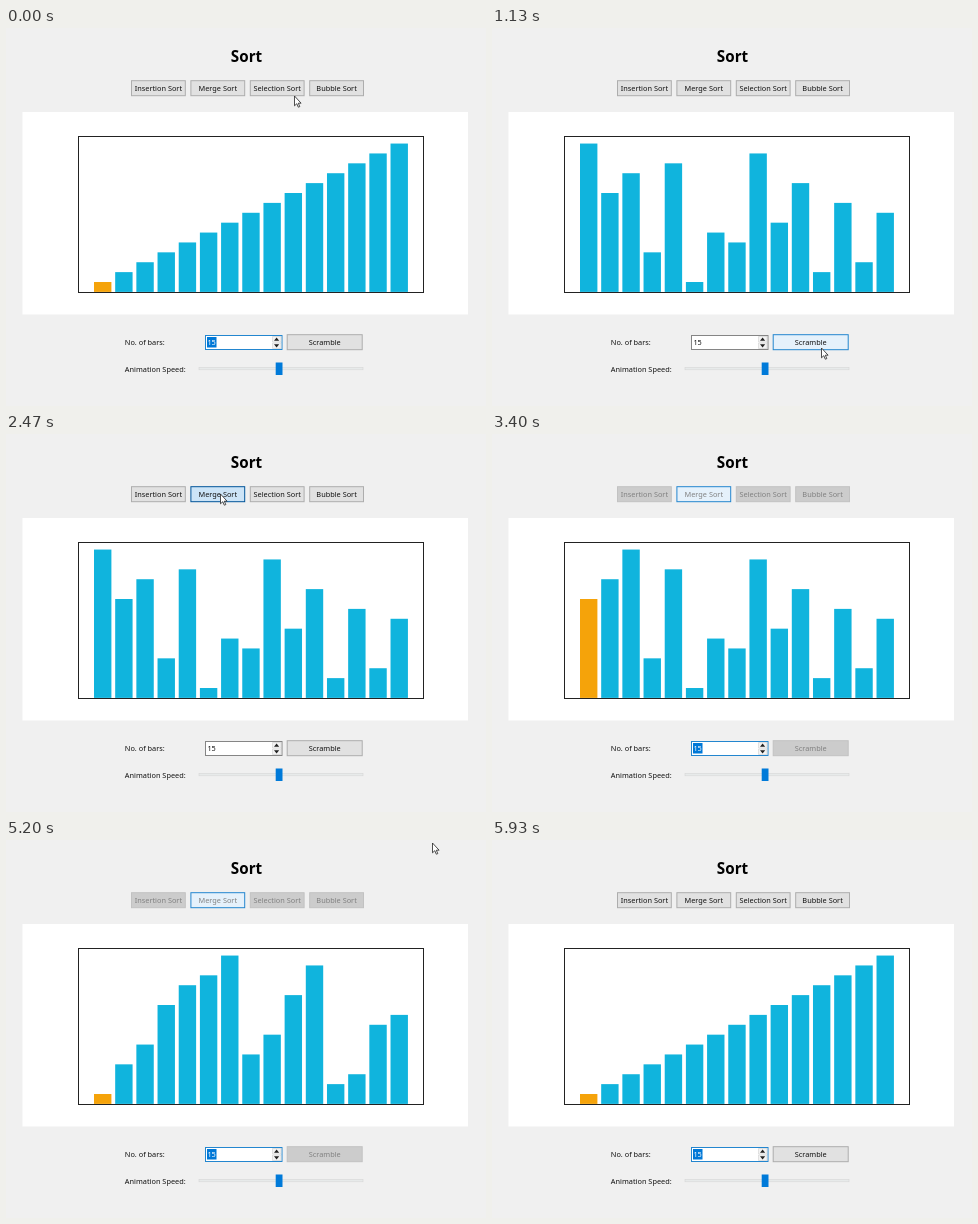
Animation of 480 by 378 pixels, one loop 6070 ms. Source, as an HTML page:

```html
<!DOCTYPE html>
<html lang="en">
<head>
<meta charset="utf-8">
<title>Sort</title>
<style>
  html, body { margin: 0; width: 100%; height: 100%; overflow: hidden; background: #f0f0f0; }
  svg { display: block; width: 480px; height: 378px; }
  text { font-family: "Noto Sans", "Open Sans", sans-serif; font-size: 7.35px; fill: #111; }
  .title { font-size: 15.2px; font-weight: 700; fill: #000; }
  .button rect { fill: #e1e1e1; stroke: #adadad; }
  .button text { text-anchor: middle; }
  .disabled rect { fill: #ccc; stroke: #c2c2c2; }
  .disabled text { fill: #808080; }
  .hover rect { fill: #e5f1fb; stroke: #2386cf; }
  .pressed rect { fill: #cce4f7; stroke: #005499; }
</style>
</head>
<body>
<svg id="stage" viewBox="0 0 480 378">
  <rect width="480" height="378" fill="#f0f0f0"/>
  <text class="title" x="240.5" y="33.5" text-anchor="middle">Sort</text>
  <rect x="16.5" y="84" width="445.5" height="202.5" fill="#fff"/>
  <g id="bars"></g>
  <rect x="72.5" y="108.5" width="345" height="156" fill="none" stroke="#222"/>
  <g id="buttons"></g>

  <text x="118.8" y="317">No. of bars:</text>
  <rect id="spin" x="199.5" y="307.5" width="76.5" height="14" fill="#fff"/>
  <rect id="selection" x="201" y="309" width="9.5" height="10.5" fill="#0078d7"/>
  <text id="count" x="201.4" y="317">15</text>
  <path d="M266.5 308.5h8.5v5.5h-8.5zM266.5 315h8.5v5.5h-8.5z" fill="#f3f3f3" stroke="#d0d0d0" stroke-width=".6"/>
  <path d="M268 312.8l2.6-3.3 2.6 3.3zM268 316.2l2.6 3.3 2.6-3.3z" fill="#222"/>

  <text x="118.8" y="344">Animation Speed:</text>
  <rect x="193" y="339.6" width="164" height="2.2" fill="#e7eaea" stroke="#d6d6d6" stroke-width=".6"/>
  <rect x="269.7" y="334.5" width="6.8" height="12.5" fill="#007ad9"/>
  <path id="cursor" d="M.5 0V9.8L2.8 7.7 4.3 11.2 5.8 10.6 4.3 7.2H7.1Z" fill="#fff" stroke="#222" stroke-width=".8"/>
</svg>
<script>
const LOOP = 6070;
const SCRAMBLE = 1000, SORT = 2528, MERGE_DELAY = 208;
const START = [15, 10, 12, 4, 13, 1, 6, 5, 14, 7, 11, 2, 9, 3, 8];
const SORTED = START.map((_, i) => i + 1);
const $ = id => document.getElementById(id);

function add(parent, tag, attrs, text = '') {
  const node = document.createElementNS('http://www.w3.org/2000/svg', tag);
  for (const key in attrs) node.setAttribute(key, attrs[key]);
  node.textContent = text;
  parent.append(node);
  return node;
}

// One snapshot of the whole list after every merge.
function mergeStates(list) {
  const work = [...list], states = [[...list]];
  (function sort(lo, hi) {
    if (hi - lo < 2) return;
    const mid = (lo + hi) >> 1;
    sort(lo, mid);
    sort(mid, hi);
    const part = work.slice(lo, hi).sort((a, b) => a - b);
    work.splice(lo, hi - lo, ...part);
    states.push([...work]);
  })(0, work.length);
  return states;
}

const STATES = mergeStates(START);
const FINISH = SORT + MERGE_DELAY * (STATES.length - 1);

const bars = SORTED.map((_, i) => add($('bars'), 'rect', { x: 88 + i * 21.18, width: 17.4 }));

function makeButton(label, x, y, width) {
  const group = add($('buttons'), 'g', {});
  add(group, 'rect', { x, y, width, height: 15 });
  add(group, 'text', { x: x + width / 2, y: y + 10.5 }, label);
  return { group, x, y, width };
}

const sorters = ['Insertion Sort', 'Merge Sort', 'Selection Sort', 'Bubble Sort']
  .map((label, i) => makeButton(label, 125.5 + i * 59.4, 52.7, 53.8));
const merge = sorters[1];
const scramble = makeButton('Scramble', 281.2, 306.7, 75);
const buttons = [...sorters, scramble];

// Cursor waypoints: time, x, y
const PATH = [
  [0, 288, 68], [70, 288, 68], [360, 306, 190], [670, 329, 320],
  [1370, 329, 320], [1670, 255, 80], [1900, 214, 60],
  [2680, 214, 60], [3070, 250, -14],
  [5060, 424, -14], [5200, 426, 3], [5260, 426, 3], [5400, 426, -14], [LOOP, 426, -14]
];

function cursorAt(t) {
  const i = PATH.findIndex(p => p[0] > t);
  const [t0, x0, y0] = PATH[i - 1], [t1, x1, y1] = PATH[i];
  const k = (t - t0) / (t1 - t0);
  return [x0 + (x1 - x0) * k, y0 + (y1 - y0) * k];
}

const inside = (b, x, y) => x >= b.x && x <= b.x + b.width && y >= b.y && y <= b.y + 15;

function valuesAt(t) {
  if (t < SCRAMBLE || t >= FINISH) return SORTED;
  return STATES[Math.max(0, Math.floor((t - SORT) / MERGE_DELAY))];
}

function render(t) {
  const [x, y] = cursorAt(t);
  const sorting = t >= SORT && t < FINISH;
  const scrambled = t >= SCRAMBLE && t < SORT;

  valuesAt(t).forEach((value, i) => {
    const height = value * 9.89;
    bars[i].setAttribute('y', 263.9 - height);
    bars[i].setAttribute('height', height);
    bars[i].setAttribute('fill', i === 0 && !scrambled ? '#f5a30a' : '#10b4dd');
  });

  for (const b of buttons) {
    const pressed = b === scramble && t >= SCRAMBLE - 90 && t < SCRAMBLE ||
                    b === merge && t >= SORT - 90 && t < SORT;
    const hover = sorting ? b === merge : inside(b, x, y);
    b.group.setAttribute('class', ['button', sorting && 'disabled', hover && 'hover', pressed && 'pressed']
      .filter(Boolean).join(' '));
  }

  $('spin').setAttribute('stroke', scrambled ? '#858585' : '#2386cf');
  $('selection').setAttribute('visibility', scrambled ? 'hidden' : 'visible');
  $('count').style.fill = scrambled ? '#111' : '#fff';
  $('cursor').setAttribute('transform', `translate(${x} ${y})`);
}

const begin = performance.now();
function tick() {
  render((performance.now() - begin) % LOOP);
  requestAnimationFrame(tick);
}
tick();
</script>
</body>
</html>
```
